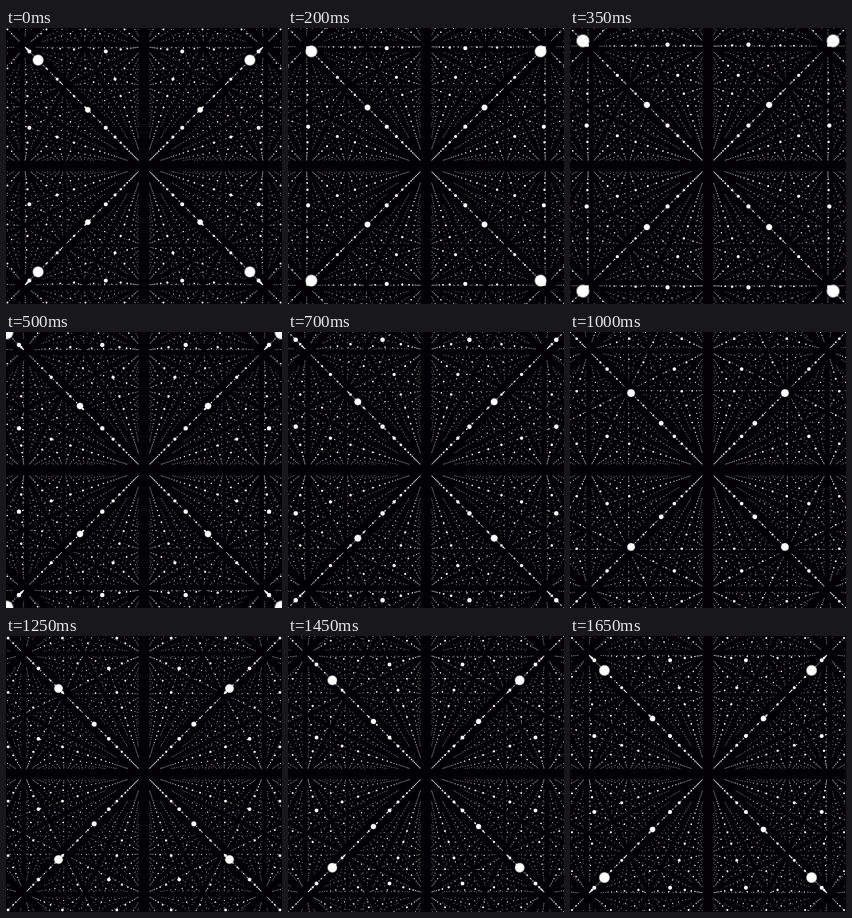
These frames come from a looping animation (498x498 px, 1.7 s). An HTML page with a canvas:

```html
<!DOCTYPE html>
<html lang="en">
<head>
<meta charset="utf-8">
<title>Star lattice</title>
<style>
  html, body { margin: 0; width: 100%; height: 100%; overflow: hidden; background: #020004; }
  canvas { display: block; }
</style>
</head>
<body>
<canvas id="stage" width="498" height="498"></canvas>
<script>
const SIZE = 498, MID = SIZE / 2;
const LOOP = 1700, STEP = 50;
const FOCAL = 215.7;   // offset of the innermost column at depth 1
const RADIUS = 11;     // ball radius at depth 1
const FAR = 21.5;

// [time, depth of the nearest layer]
const KEYS = [[0, 1.129], [200, 1.043], [500, 0.868], [700, 0.753],
              [1000, 0.554], [1250, 0.398], [1650, 0.154], [1700, 0.129]];

const ctx = document.getElementById('stage').getContext('2d');

function depthAt(t) {
  const i = KEYS.findIndex(k => k[0] > t);
  const [t0, z0] = KEYS[i - 1], [t1, z1] = KEYS[i];
  return z0 + (z1 - z0) * (t - t0) / (t1 - t0);
}

function softBall(x, y, r) {
  const edge = r * 1.12;
  const g = ctx.createRadialGradient(x, y, 0, x, y, edge);
  g.addColorStop(0, '#fff');
  g.addColorStop(0.76, '#fff');
  g.addColorStop(1, 'rgba(255,255,255,0)');
  ctx.fillStyle = g;
  ctx.fillRect(x - edge, y - edge, 2 * edge, 2 * edge);
}

function drawLayer(z) {
  const gap = FOCAL / z, r = Math.max(RADIUS / z, 0.6);
  const reach = (MID + 2 * r) / gap;
  ctx.beginPath();
  for (let i = 1; i <= reach; i += 2) {
    for (let j = 1; j <= reach; j += 2) {
      for (const sx of [-1, 1]) {
        for (const sy of [-1, 1]) {
          const x = MID + sx * i * gap, y = MID + sy * j * gap;
          if (r > 4) {
            softBall(x, y, r);
          } else {
            ctx.moveTo(x + r, y);
            ctx.arc(x, y, r, 0, 2 * Math.PI);
          }
        }
      }
    }
  }
  ctx.fillStyle = '#fff';
  ctx.fill();
}

let shown = -1;
function frame(now) {
  const t = Math.floor((now % LOOP) / STEP) * STEP;
  if (t !== shown) {
    shown = t;
    ctx.fillStyle = '#020004';
    ctx.fillRect(0, 0, SIZE, SIZE);
    for (let z = depthAt(t); z <= FAR; z++) drawLayer(z);
  }
  requestAnimationFrame(frame);
}
frame(0);
</script>
</body>
</html>
```
